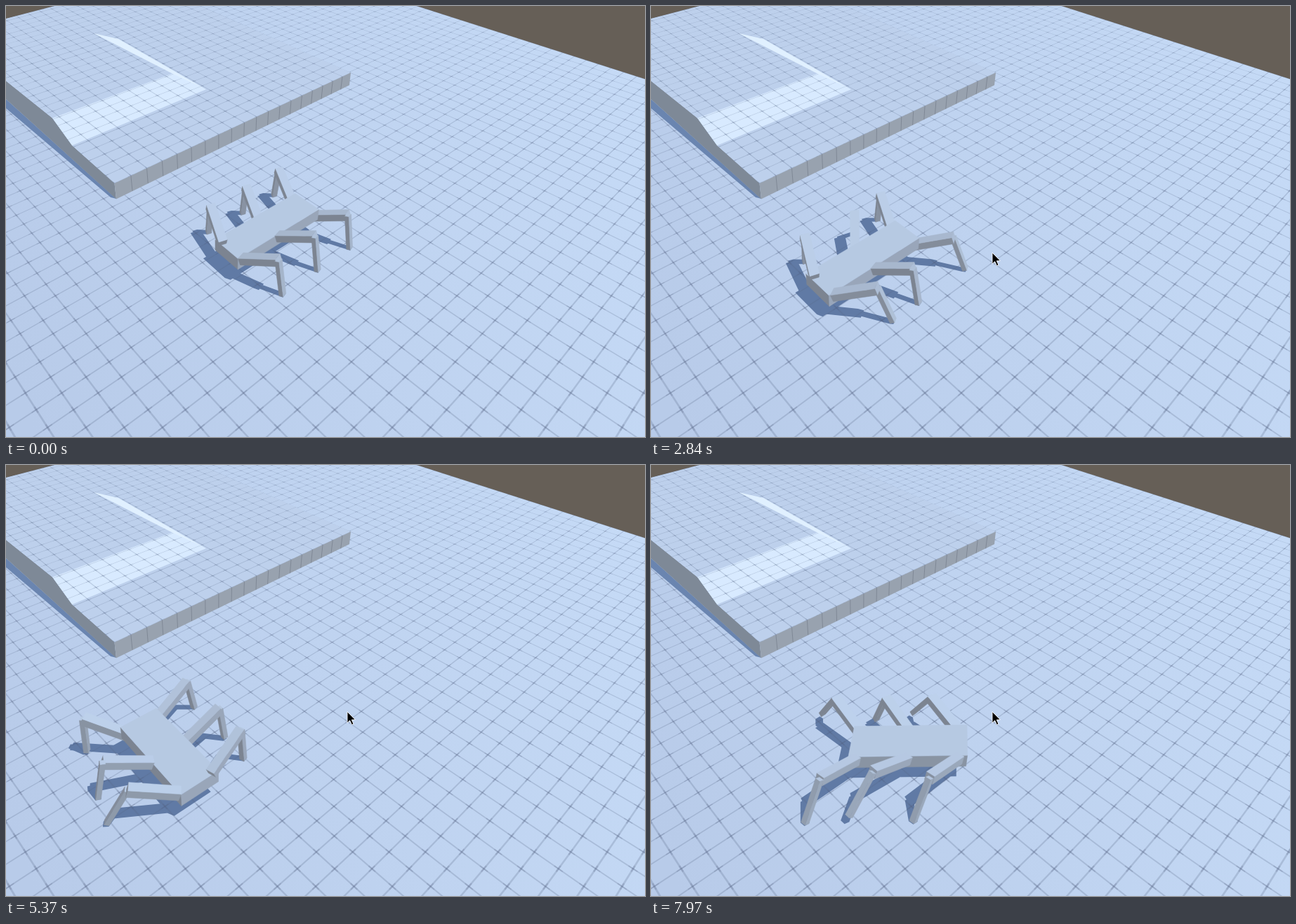
Recreate the animation shown at these times as an HTML page with a canvas. Size 910 by 615 pixels, loop 8 s.

```html
<!DOCTYPE html>
<html lang="en">
<head>
<meta charset="utf-8">
<title>Walking robot</title>
<style>
html, body { margin: 0; width: 100%; height: 100%; overflow: hidden; background: #665f57; }
canvas { display: block; }
</style>
</head>
<body>
<canvas id="stage" width="910" height="615"></canvas>
<script>
const W = 910, H = 615, LOOP = 8000;
const stage = document.getElementById('stage').getContext('2d');

// Perspective: world origin on screen and the vanishing points of the three axes.
const ORIGIN = [157, 275], VU = [1480, -369], VV = [-565, -369], VZ = [300, 1500];
const CELL = 0.0177, RISE = 0.01764;
const CAMERA = [-11.7, -25.3, 19.6];
const SUN = [0.168, -0.441, 0.882], SHADOW = [-0.18, 0.46];

const depth = ([u, v, z]) => 1 + CELL * (u + v) - RISE * z;
function project([u, v, z = 0]) {
  const w = depth([u, v, z]);
  return [0, 1].map(i =>
    (ORIGIN[i] + CELL * (u * VU[i] + v * VV[i]) - RISE * z * VZ[i]) / w);
}
function unproject([x, y], z) {
  const g = RISE * z;
  const sum = (ORIGIN[1] - g * VZ[1] - y * (1 - g)) / (y - VU[1]);
  const w = 1 + sum - g;
  const a = (x * w - ORIGIN[0] + g * VZ[0] - sum * VV[0]) / (VU[0] - VV[0]);
  return [a / CELL, (sum - a) / CELL];
}

const mix = (a, b, t) => a.map((n, i) => n + (b[i] - n) * t);
const add = (a, b, k = 1) => a.map((n, i) => n + b[i] * k);
const dot = (a, b) => a.reduce((s, n, i) => s + n * b[i], 0);
const unit = a => { const l = Math.hypot(...a) || 1; return a.map(n => n / l); };
const cross = (a, b) => [a[1] * b[2] - a[2] * b[1], a[2] * b[0] - a[0] * b[2], a[0] * b[1] - a[1] * b[0]];
const rotate = ([x, y], r) => [x * Math.cos(r) - y * Math.sin(r), x * Math.sin(r) + y * Math.cos(r)];
const clamp = n => Math.min(1, Math.max(0, n));
const smooth = n => n * n * (3 - 2 * n);

function trace(c, points) {
  points.forEach(([x, y], i) => i ? c.lineTo(x, y) : c.moveTo(x, y));
  c.closePath();
}
function fill(c, points, color) {
  c.beginPath();
  trace(c, points);
  c.fillStyle = color;
  c.fill();
}
function layer(paint) {
  const canvas = document.createElement('canvas');
  canvas.width = W;
  canvas.height = H;
  paint(canvas.getContext('2d'));
  return canvas;
}

// ---- Scenery ----
const U_END = 35.5, V_END = 31.5;

function grid(c, z, u0, u1, v0, v1) {
  const strip = (a, b, n, half, swap, color) => {
    const quad = [[a, n - half], [b, n - half], [b, n + half], [a, n + half]];
    fill(c, quad.map(([p, q]) => project(swap ? [q, p, z] : [p, q, z])), color);
  };
  const family = (from, to, start, end, swap) => {
    for (let n = from; n <= to; n++) {
      strip(start, end, n, 0.03, swap, 'rgba(88,104,136,.24)');
      for (let m = start; m < end; m++)
        strip(m - 0.17, m + 0.17, n, 0.03, swap, 'rgba(76,90,120,.18)');
    }
  };
  family(v0, v1, u0, u1, false);
  family(u0, u1, v0, v1, true);
}

const ground = layer(c => {
  const tone = c.createLinearGradient(0, 500, 910, 150);
  tone.addColorStop(0, '#b8cbe9');
  tone.addColorStop(1, '#c5daf6');
  fill(c, [[-10, -27], [U_END, -27], [U_END, V_END], [-10, V_END]].map(project), tone);
});
const groundGrid = layer(c => grid(c, 0, -10.5, U_END, -27.5, V_END));

const platform = layer(c => {
  const top = [[154.5, 253], [491, 95], [278, 0], [72, 0], [0, 18], [0, 107], [66, 160], [94, 199]];
  fill(c, [[157, 275], [0, 133], [0, 146], [149, 273]], '#6a85b0');
  fill(c, [[0, 107], [66, 160], [94, 199], [154.5, 253], [157, 275.5], [0, 133]], '#7e8997');
  fill(c, [[154.5, 253], [491, 95], [489, 113], [157, 275.5]], '#98a2af');
  c.strokeStyle = 'rgba(90,99,113,.4)';
  c.beginPath();
  for (let n = 1; n < 19; n++) {
    c.moveTo(...project([n, 0, 0]));
    c.lineTo(...project([n, 0, 1]));
  }
  c.stroke();
  c.save();
  c.beginPath();
  trace(c, top);
  c.clip();
  fill(c, top, '#bdd0ec');
  fill(c, [[66, 160], [94, 199], [285, 119], [238, 96]], '#d8eaff');
  grid(c, 1, 0, 19, 0, 32);
  fill(c, [[125, 39], [160, 47], [285, 119], [238, 97]], '#e0f0ff');
  c.restore();
});

// ---- Robot ----
const BODY = { length: 5.05, width: 1.79, thick: 0.63, top: 1.4 };
const LEG = { hip: 1.1, spread: 2.2, inset: 0.75, reach: 2.2, lag: 0.7, upper: 2.1, lower: 1.9 };
const STRIDE = 560;

// time, screen x and y of the body top, heading in degrees, easing power to the next point
const PATH = [
  [1500, 374, 311, -1, 1.6], [2060, 358, 324, 0, 1.1], [3540, 249, 388, 0, 1], [4660, 225, 405, 52, 1],
  [5370, 230, 404, 88, 0.9], [6640, 235, 401, 136, 3], [7970, 368, 393, 136, 1]
];

function bodyAt(time) {
  const n = Math.max(0, PATH.findLastIndex(p => p[0] <= time));
  const from = PATH[n], to = PATH[n + 1] || from;
  const f = clamp((time - from[0]) / (to[0] - from[0] || 1)) ** from[4];
  const [, x, y, heading] = mix(from, to, f);
  return { centre: unproject([x, y], BODY.top), yaw: heading * Math.PI / 180 };
}
const toWorld = (body, p, z) => [...add(rotate(p, body.yaw), body.centre), z];

// Legs 0-2 are on the right, 3-5 on the left; odd and even legs swing in turn.
function legAt(time, i) {
  const side = i < 3 ? -1 : 1, x = (i % 3 - 1) * LEG.spread;
  const hip = toWorld(bodyAt(time), [x, side * LEG.inset], LEG.hip);
  const home = [x + LEG.lag, side * (LEG.inset + LEG.reach)];
  const beat = time / STRIDE + i % 2 / 2, n = Math.floor(beat);
  const plant = k => toWorld(bodyAt((k + 0.5 - i % 2 / 2) * STRIDE), home, 0);
  const a = plant(n - 1), b = plant(n), q = smooth(clamp(2 * (beat - n)));
  const target = mix(a, b, q);
  target[2] = Math.min(0.4, Math.hypot(...add(b, a, -1)) * 0.4) * Math.sin(Math.PI * q);

  // Two-bone reach with the knee bent upwards.
  const line = add(target, hip, -1), dir = unit(line);
  const span = Math.min(Math.hypot(...line), LEG.upper + LEG.lower - 0.01);
  const along = (LEG.upper ** 2 - LEG.lower ** 2 + span ** 2) / (2 * span);
  const bend = Math.sqrt(Math.max(0, LEG.upper ** 2 - along ** 2));
  const up = unit(add([0, 0, 1], dir, -dir[2]));
  return { hip, knee: add(add(hip, dir, along), up, bend), foot: add(hip, dir, span) };
}

function robotAt(time) {
  const body = bodyAt(time), half = BODY.length / 2, mid = BODY.top - BODY.thick / 2;
  const boxes = [box(toWorld(body, [-half, 0], mid), toWorld(body, [half, 0], mid), BODY.width, BODY.thick)];
  for (let i = 0; i < 6; i++) {
    const { hip, knee, foot } = legAt(time, i);
    boxes.push(box(hip, knee, 0.42, 0.36), box(knee, foot, 0.25, 0.22));
  }
  return boxes.sort((a, b) => depth(b.centre) - depth(a.centre));
}

// ---- Solids ----
const RING = [[-1, -1], [1, -1], [1, 1], [-1, 1]];

function box(a, b, width, height) {
  const axis = unit(add(b, a, -1));
  const side = unit(cross(axis, [0, 0, 1])), up = cross(side, axis);
  const centre = mix(a, b, 0.5), length = Math.hypot(...add(b, a, -1));
  const arms = [[axis, length / 2], [side, width / 2], [up, height / 2]];
  const faces = arms.flatMap(([normal, reach], k) => {
    const [p, q] = arms.filter((_, j) => j !== k);
    return [-1, 1].map(sign => ({
      normal: normal.map(n => n * sign),
      points: RING.map(([s, t]) =>
        add(add(add(centre, normal, sign * reach), p[0], s * p[1]), q[0], t * q[1]))
    }));
  });
  return { faces, centre, corners: [...faces[0].points, ...faces[1].points] };
}

function drawBox(c, solid) {
  for (const { normal, points } of solid.faces) {
    if (dot(normal, add(CAMERA, points[0], -1)) <= 0) continue;
    const light = Math.max(0, dot(normal, SUN));
    const color = `rgb(${mix([124, 132, 145], [190, 210, 237], light).map(Math.round)})`;
    fill(c, points.map(project), color);
    c.strokeStyle = color;
    c.lineWidth = 0.5;
    c.stroke();
  }
}

function hull(points) {
  points.sort((a, b) => a[0] - b[0] || a[1] - b[1]);
  const half = list => list.reduce((out, p) => {
    const bent = (a, b) => (b[0] - a[0]) * (p[1] - a[1]) - (b[1] - a[1]) * (p[0] - a[0]) <= 0;
    while (out.length > 1 && bent(out.at(-2), out.at(-1))) out.pop();
    out.push(p);
    return out;
  }, []);
  return [...half(points).slice(0, -1), ...half(points.slice().reverse()).slice(0, -1)];
}

function drawShadow(c, solid) {
  const cast = ([u, v, z]) => project([u + SHADOW[0] * z, v + SHADOW[1] * z, 0]);
  fill(c, hull(solid.corners.map(cast)), '#607aa5');
}

// ---- Pointer ----
const ENTRIES = [
  { from: 70, to: 1110, start: [798, 55], end: [-20, 180], sag: 330 },
  { from: 1500, to: 2060, start: [520, 163], end: [486, 352], sag: 0 }
];
const ARROW = [[0, 0], [0, 16], [3.7, 12.6], [6.4, 18.6], [9, 17.5], [6.3, 11.7], [11.3, 11.5]];

function drawPointer(c, time) {
  const entry = ENTRIES.findLast(e => e.from <= time);
  if (!entry) return;
  const f = clamp((time - entry.from) / (entry.to - entry.from));
  const tip = add(mix(entry.start, entry.end, f), [0, entry.sag * Math.sin(Math.PI * f)]);
  fill(c, ARROW.map(p => add(p, tip)), '#000');
  c.strokeStyle = 'rgba(255,255,255,.85)';
  c.lineWidth = 1;
  c.stroke();
}

function draw(time) {
  const robot = robotAt(time);
  stage.fillStyle = '#665f57';
  stage.fillRect(0, 0, W, H);
  stage.drawImage(ground, 0, 0);
  robot.forEach(solid => drawShadow(stage, solid));
  stage.drawImage(groundGrid, 0, 0);
  stage.drawImage(platform, 0, 0);
  robot.forEach(solid => drawBox(stage, solid));
  drawPointer(stage, time);
}

const began = performance.now();
function tick() {
  draw((performance.now() - began) % LOOP);
  requestAnimationFrame(tick);
}
tick();
</script>
</body>
</html>
```
